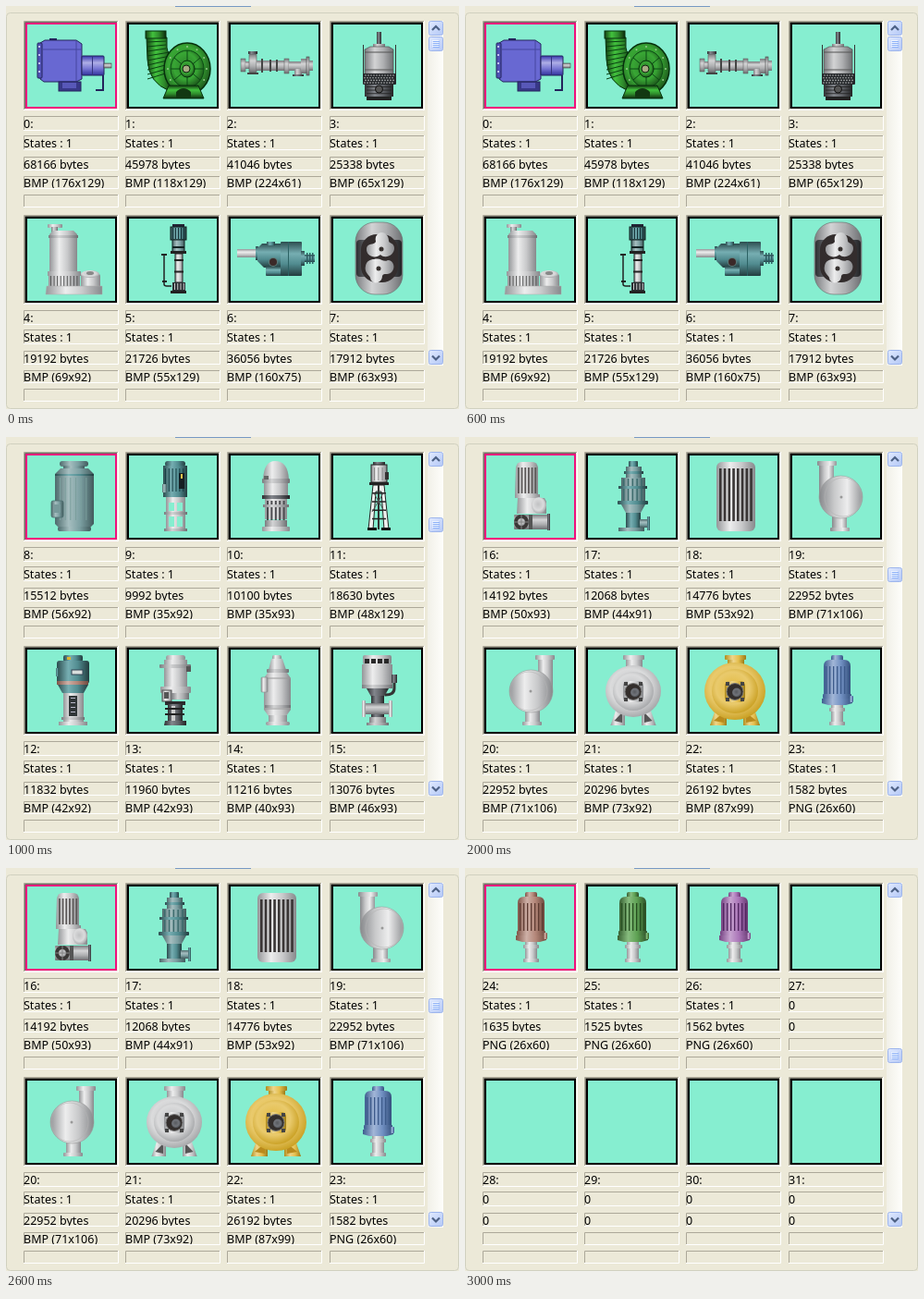
Write an HTML page that moves like this. It is 490 px wide and 436 px high and loops after 4 s.

```html
<!DOCTYPE html>
<html lang="en">
<head>
<meta charset="utf-8">
<title>Pump symbol library</title>
<style>
html, body { margin: 0; width: 100%; height: 100%; overflow: hidden; background: #ece9d8; }
svg { display: block; }
text { font: 12.5px "Noto Sans", "Open Sans", sans-serif; fill: #000; }
</style>
</head>
<body>
<script>
// Palettes [hue, saturation, lightness]; paint 'gx' is grey shaded along x, 'gy' along y, 'gr' radially.
const palettes = {
  g: [220, 2, 66], w: [220, 2, 76], d: [220, 4, 36], t: [184, 28, 41], s: [184, 17, 53],
  b: [240, 52, 62], n: [118, 52, 33], y: [45, 74, 57], u: [217, 40, 57],
  r: [14, 28, 56], e: [112, 32, 45], p: [288, 32, 56]
};
const ramp = [[0, -17], [.35, 17], [.65, 3], [1, -22]];
let defs = '';
for (const [key, [h, s, l]] of Object.entries(palettes)) {
  const stops = list => list.map(([o, k]) => `<stop offset="${o}" stop-color="hsl(${h},${s}%,${l + k}%)"/>`).join('');
  defs += `<linearGradient id="${key}x">${stops(ramp)}</linearGradient>
    <linearGradient id="${key}y" x2="0" y2="1">${stops(ramp)}</linearGradient>
    <radialGradient id="${key}r" cx=".45" cy=".43" r=".6">${stops([[0, 0], [.6, 10], [1, -12]])}</radialGradient>`;
}

const paint = f => f.length === 2 ? `url(#${f})` : f;
const edge = (c, w = 1) => c ? ` stroke="${c}" stroke-width="${w}"` : '';
const rect = (x, y, w, h, f, r = 0, c, cw) =>
  `<rect x="${x}" y="${y}" width="${w}" height="${h}" rx="${r}" fill="${paint(f)}"${edge(c, cw)}/>`;
const oval = (x, y, rx, ry, f, c, w) =>
  `<ellipse cx="${x}" cy="${y}" rx="${rx}" ry="${ry}" fill="${paint(f)}"${edge(c, w)}/>`;
const path = (d, f, c, w) => `<path d="${d}" fill="${paint(f)}"${edge(c, w)}/>`;
const line = (d, c, w = 1) => path(d, 'none', c, w);
const repeat = (n, fn) => Array.from({ length: n }, (_, i) => fn(i)).join('');
const bars = (x, y, w, h, n, c, t = 1) => repeat(n, i => rect(x + i * w / n, y, t, h, c));
const rungs = (x, y, w, h, n, c, t = 1) => repeat(n, i => rect(x, y + i * h / n, w, t, c));
const mirror = (s, w) => `<g transform="translate(${w}) scale(-1 1)">${s}</g>`;

const volute = () => [
  rect(60, 13, 16, 38, 'wx'), rect(57, 10, 21, 5, 'wx', 1),
  rect(46, 64, 16, 19, 'wx'), rect(43, 82, 21, 4, 'wx', 1),
  oval(52.5, 49, 23.5, 23, 'wx', '#999', .6), oval(50, 49, 20, 21, 'none', '#b4b4b4', .6), oval(52, 49, 1.5, 1.5, '#999')
].join('');

const casing = (k, cx, r, dark) => {
  const foot = r * .82;
  return [
    path(`M${cx - foot + 7} 66L${cx - foot} 86H${cx - 9}V72Z`, k + 'x'), path(`M${cx + foot - 7} 66L${cx + foot} 86H${cx + 9}V72Z`, k + 'x'),
    path(`M${cx - foot + 4} 81L${cx - 12} 72V83Z`, dark), path(`M${cx + foot - 4} 81L${cx + 12} 72V83Z`, dark),
    rect(cx - 8, 14, 18, 14, k + 'x'), rect(cx - 11, 10, 23, 5, k + 'x', 1),
    oval(cx, 49, r, r - 2, k + 'r'), oval(cx, 49, r - 8, r - 9, k + 'r'),
    rect(cx - 11, 38, 22, 23, k + 'x', 5),
    ...[[-8, 41], [8, 41], [-8, 58], [8, 58]].map(([x, y]) => rect(cx + x - 2, y - 2, 4, 4, '#444')),
    oval(cx, 49.5, 9, 9, '#332e2c', '#777'), oval(cx + 2, 50.5, 5, 5, 'dr')
  ];
};

const canned = (k, dark) => [
  rect(46, 10, 13, 7, k + 'x', 2), path('M38 37V22Q38 15 45 15H60Q67 15 67 22V37Z', k + 'x'),
  rect(38, 22, 29, 33, k + 'x'), bars(40, 22, 28, 30, 7, dark, 1.3),
  rect(37, 52, 31, 5, k + 'x', 1), path('M36 57H69V62L62 64H43L36 62Z', k + 'x'),
  rect(66, 54, 4, 7, k + 'x', 1), rect(46, 64, 13, 20, 'wx'), rect(44, 67, 17, 4, 'wx', 1), rect(44, 82, 17, 4, 'wx', 1)
];

const pumps = [
  () => [
    rect(28, 19, 8, 4, '#24245c'), path('M18 24L23 21H57L63 25V63L57 66H22L18 63Z', '#6868d2', '#24245c'),
    rect(15, 24, 5, 38, '#5050b4', 1, '#24245c'), line('M21 31H62M57 22V65', '#4646a0'),
    repeat(4, i => rect(16, 27 + i * 9, 2, 2, '#c0c0f0')),
    rect(63, 38, 24, 21, 'by', 1, '#24245c'), rect(74, 38, 1, 21, '#33337c'), rect(87, 46, 8, 5, 'gy', 0, '#444', .6),
    rect(38, 66, 24, 10, '#383888', 0, '#24245c'), rect(42, 67, 15, 6, '#5858b8'), line('M86 59V75H78', '#24245c', 2)
  ],
  () => [
    path('M23 18H45V29Q46 36 52 40L48 76Q25 67 24 42Z', 'nx', '#06300c'),
    repeat(9, i => line(`M24 ${23 + i * 5}L${i < 3 ? 44 : 45 + i} ${22 + i * 4}`, '#0a4012')),
    rect(22, 11, 22, 8, 'nx', 0, '#06300c'),
    oval(67, 52, 25, 28, 'nr', '#06300c', 1.5), oval(67, 52, 18, 20, 'nr', '#0b4a14'),
    repeat(12, i => { const a = i * Math.PI / 6; return oval(67 + 21 * Math.cos(a), 52 + 24 * Math.sin(a), 1, 1, '#94c88a'); }),
    line('M53 40L81 64M53 64L81 40M67 32V72M49 52H85', '#0b4a14'),
    oval(67, 52, 8, 9, 'nr', '#06300c'), oval(66, 52, 4, 4, '#a8aa84', '#121'),
    path('M47 70H79L85 84H41Z', 'ny', '#06300c'), path('M55 83V77Q63 69 71 77V83Z', '#123812')
  ],
  () => [
    rect(15, 41, 5, 14, 'gy', 0, '#555', .5), rect(20, 44, 5, 8, 'gy'), rect(24, 36, 8, 20, 'gy', 1, '#555', .6),
    rect(23, 33, 10, 3, 'dx'), rect(32, 43, 32, 11, 'gy'), rect(37, 41, 2, 15, '#444'),
    rect(46, 42, 2, 13, '#444'), rect(53, 42, 2, 13, '#444'), rect(62, 41, 5, 16, 'gy', 0, '#555', .5), rect(67, 44, 14, 10, 'gy'),
    rect(73, 52, 8, 7, 'gx'), rect(71, 58, 12, 2, 'dx'), rect(80, 41, 6, 16, 'gy'), rect(86, 39, 3, 20, 'gy', 0, '#444', .6),
    rect(89, 43, 4, 11, 'gy'), rect(22, 56, 12, 2, '#444')
  ],
  () => [
    line('M36.500 26V58M71.500 26V58', '#333'), rect(51, 12, 5, 18, 'dx'), rect(47, 25, 13, 5, 'gx'),
    path('M38 31L44 28H64L69 31V58H38Z', 'gx', '#444', .6),
    line('M38 34H69M38 53H69', '#555'), rect(36, 57, 36, 12, '#24272a', 1),
    repeat(4, r => repeat(11, i => oval(39 + i * 3 - r % 2, 59 + r * 2.7, .8, .8, '#b5b7b7'))),
    rect(38, 69, 31, 13, 'dx'), rungs(40, 71, 27, 11, 3, '#222', .8), oval(53.5, 74, 4, 4, '#555', '#111'),
    rect(40, 82, 27, 4, '#222')
  ],
  () => [
    rect(26, 10, 16, 4, 'wx', 1), rect(30, 13, 7, 7, 'gx'), path('M28 21L32 17H54L58 21V64H28Z', 'wx'),
    rect(27, 22, 32, 3, 'gx'), rect(26, 61, 36, 5, 'wx'), rect(27, 66, 34, 12, 'wx'), bars(29, 66, 32, 11, 9, '#555'),
    rect(62, 64, 21, 16, 'wx', 2), oval(72, 64, 10, 4, 'wr'), oval(72, 63, 4, 2, '#888'),
    path('M25 77H85V86H24Z', 'wx', '#aaa', .5)
  ],
  () => [
    rect(51, 10, 13, 3, '#223'), rect(49, 13, 17, 14, 'tx', 0, '#122'), bars(51, 14, 15, 12, 5, '#173238'),
    rect(51, 27, 13, 13, 'sx', 0, '#122'), rect(51, 34, 13, 2, '#122'), rect(49, 39, 17, 3, '#222'),
    rect(54, 42, 8, 31, 'wx', 0, '#222'), rungs(53, 48, 10, 25, 2, '#222', 2),
    line('M42 44V75Q42 77 45 77H50', '#222', 1.5), rect(39, 42, 6, 2, '#222'), rect(40, 71, 5, 2, '#222'),
    rect(51, 73, 14, 10, '#2c3034'), bars(53, 74, 13, 7, 4, '#ccc'), rect(49, 82, 17, 3, '#222')
  ],
  () => [
    rect(11, 37, 24, 9, 'wy'), rect(31, 34, 3, 15, 'ty'), path('M33 36L38 31H59V57H40L33 50Z', 'ty'),
    rect(43, 29, 9, 4, 'tx'), rect(42, 56, 19, 10, 'ty', 1), rect(58, 29, 23, 37, 'ty', 1), rect(66, 29, 1, 37, '#2c6264'),
    rect(80, 39, 4, 16, 'ty'), rect(84, 43, 11, 8, 'ty'), bars(86, 41, 9, 12, 3, '#2c5b60', 1.5),
    oval(50, 51, 5, 5, '#5f7c7a'), oval(50, 51, 4, 4, '#3b2928')
  ],
  () => [
    rect(28, 8, 51, 78, 'gx', 21, '#666', .6), rect(29, 27, 49, 40, 'dx', 4), rect(34, 21, 40, 52, '#332d2d', 17),
    path('M53 20C59 17 64 22 64 28C64 31 70 30 70 36C70 44 60 48 55 43C50 48 39 45 40 36C41 30 48 33 50 29C49 25 50 22 53 20Z', 'wx'),
    path('M48 48C56 46 58 52 63 49C69 49 72 57 67 62C62 66 59 62 57 66C57 75 45 76 44 68C43 65 37 62 39 55C40 50 44 48 48 48Z', 'wx'),
    oval(56, 37, 2.5, 2.5, '#37312f'), oval(53, 58, 2.5, 2.5, '#37312f')
  ],
  () => [
    rect(39, 10, 31, 6, 'sx', 3), rect(43, 15, 23, 5, 'sx'), path('M34 24L40 18H70L76 24V78L72 82H38L34 78Z', 'sx'),
    rect(34, 24, 42, 2, 'tx'), bars(39, 28, 34, 46, 6, '#7b9f9d'), rect(34, 74, 42, 4, 'sx'),
    rect(37, 81, 36, 5, 'sx', 2), rect(30, 53, 13, 18, 'sx', 2, '#496c6e', .8), rect(33, 57, 7, 9, '#77999a')
  ],
  () => [
    rect(43, 10, 22, 6, 'tx', 3), rect(41, 15, 26, 31, 'tx'), bars(43, 18, 23, 25, 6, '#173e43'),
    rect(58, 23, 6, 17, '#152023'), rect(60, 24, 2, 5, '#eac34c'), rect(40, 35, 5, 9, 'sx'), rect(41, 44, 26, 5, 'tx'),
    rect(44, 49, 21, 37, 'wx'), rect(47, 55, 6, 9, '#86eed0'), rect(56, 55, 6, 9, '#86eed0'),
    rect(47, 70, 6, 11, '#86eed0'), rect(56, 70, 6, 11, '#86eed0'), rect(42, 65, 25, 3, 'gx'), rect(42, 83, 25, 3, 'gx')
  ],
  () => [
    path('M39 30Q40 10 52 10Q66 10 67 30Z', 'wx'), rect(38, 29, 30, 5, 'gx', 1), rect(40, 34, 26, 14, 'wx'),
    rect(40, 26, 5, 4, '#666'), rect(38, 47, 30, 4, 'dx'), rect(41, 51, 24, 22, 'wx'), bars(43, 53, 22, 25, 5, '#4b4b4f', 2),
    rect(39, 57, 28, 3, 'gx'), rect(41, 74, 24, 8, 'gx'), rect(38, 81, 30, 5, 'wx', 1)
  ],
  () => [
    rect(47, 11, 13, 3, 'dx'), rect(45, 14, 17, 19, 'wx', 0, '#222'), bars(48, 17, 13, 14, 3, '#888'),
    rect(60, 22, 4, 8, '#333'), rect(43, 33, 21, 3, '#222'),
    path('M47 36H59L64 84H59L56 43H50L47 84H42Z', '#eef0ee', '#222'), line('M53 36V84', '#333', 2),
    rungs(46, 44, 15, 37, 4, '#222', 1.5), line('M48 45L59 64M58 45L46 65', '#555'), rect(41, 82, 10, 3, '#111'), rect(56, 82, 10, 3, '#111')
  ],
  () => [
    rect(43, 10, 21, 7, 'tx', 2), rect(36, 16, 35, 25, 'tx', 3), rect(47, 12, 4, 3, '#e0b52f'),
    rect(52, 26, 12, 5, '#d9dfdd', 0, '#345'), rect(35, 24, 3, 9, 'tx'), rect(36, 38, 34, 4, 'rx'),
    path('M37 42H70L65 51H42Z', 'tx'), rect(43, 51, 22, 31, 'wx'), rect(49, 54, 9, 22, '#303638'),
    rungs(51, 56, 5, 20, 4, '#bbc'), rect(41, 77, 25, 3, 'gx'), rect(38, 82, 31, 4, 'wx')
  ],
  () => [
    rect(44, 10, 21, 6, 'wx', 3), rect(42, 15, 25, 29, 'wx'), rect(37, 20, 34, 4, 'gx', 1), rect(66, 22, 5, 6, '#555'),
    rect(38, 44, 33, 7, 'wx', 1), rect(40, 48, 10, 12, 'wx', 0, '#555'), rect(42, 50, 5, 7, '#555'),
    rect(50, 51, 19, 7, 'gx'), rect(43, 60, 22, 4, '#2b2b2d'), rect(46, 63, 16, 19, 'dx'),
    rect(50, 65, 4, 16, '#ccc'), rungs(43, 67, 21, 12, 2, '#222', 2), path('M43 81H66V86H42Z', 'dx')
  ],
  () => [
    rect(49, 10, 10, 5, 'wx', 2), path('M45 26L48 14H60L64 26Z', 'wx'), rect(43, 25, 24, 4, 'gx', 1),
    path('M40 35L44 29H65L69 35V69L64 76H45L40 69Z', 'wx'), line('M40 35H69M40 68H69', '#999'),
    rect(37, 34, 7, 16, 'wx', 1, '#888', .6), rect(41, 64, 28, 3, 'gx'), rect(45, 75, 20, 8, 'wx'), rect(42, 82, 26, 4, 'wx', 2)
  ],
  () => [
    rect(36, 10, 31, 10, 'wx', 2), bars(38, 14, 28, 5, 4, '#292929', 5), rect(35, 20, 33, 24, 'wx'),
    rect(35, 42, 33, 4, 'gx'), line('M70 34V46Q70 53 60 53', '#333', 3), rect(67, 31, 6, 9, 'dx'),
    path('M40 46H64L59 55H45Z', 'dx'), rect(45, 54, 14, 24, 'dx'), rect(39, 62, 26, 12, 'gy'),
    rect(35, 59, 4, 18, 'wx', 1), rect(64, 59, 4, 18, 'wx', 1), rect(43, 77, 18, 9, 'gx'), rect(40, 83, 24, 3, 'gx')
  ],
  () => [
    path('M36 17Q37 11 42 11H54Q59 11 60 17V47H35Z', 'wx'), bars(38, 17, 22, 28, 6, '#5c5858', 1.8),
    rect(35, 46, 27, 4, 'wx'), path('M38 50H67L69 54V67H37Z', 'wx'), oval(61, 58, 8, 9, 'wr'),
    rect(34, 68, 39, 16, 'gy', 1), oval(42, 76, 8, 8, '#3a3736'), oval(42, 76, 4, 4, 'gr'),
    line('M34 76H50M42 68V84', '#888'), rect(70, 67, 3, 18, 'dx'), rect(50, 68, 4, 16, '#555')
  ],
  () => [
    rect(48, 10, 10, 7, 'tx', 1), rect(45, 16, 17, 13, 'sx'), rect(43, 21, 21, 3, 'tx'),
    rect(40, 28, 26, 27, 'sx'), bars(42, 29, 24, 24, 5, '#3c6a6c', 1.5), rect(37, 37, 31, 3, 'tx'), rect(36, 53, 33, 4, 'tx', 1),
    path('M40 57H66L61 66H45Z', 'sx'), rect(45, 66, 16, 16, 'tx'), rect(60, 73, 9, 9, 'sy'), rect(68, 70, 3, 15, 'tx'),
    rect(37, 82, 28, 4, 'sx')
  ],
  () => [
    rect(33, 11, 42, 75, 'wx', 6), bars(36, 18, 38, 57, 8, '#393535', 2.6),
    rect(33, 75, 42, 3, 'wx', 1)
  ],
  () => [mirror(volute(), 109)],
  () => [volute()],
  () => casing('w', 53, 30, '#555'),
  () => casing('y', 53, 33, '#b98a1c'),
  () => canned('u', '#3c5a8a'),
  () => canned('r', '#5d3a31'),
  () => canned('e', '#254c1f'),
  () => canned('p', '#512560')
];

const files = `68166 176x129,45978 118x129,41046 224x61,25338 65x129,19192 69x92,21726 55x129,36056 160x75,17912 63x93,
15512 56x92,9992 35x92,10100 35x93,18630 48x129,11832 42x92,11960 42x93,11216 40x93,13076 46x93,
14192 50x93,12068 44x91,14776 53x92,22952 71x106,22952 71x106,20296 73x92,26192 87x99,1582 26x60,
1635 26x60,1525 26x60,1562 26x60`.split(',').map(s => s.trim().split(' '));

const columns = [19, 129, 239, 350];
const rows = [[103, 15], [124, 15], [147, 14], [168, 13], [188, 13]];

function label(text, i) {
  const [y, h] = rows[i];
  return line(`M.5 ${y + h}V${y + .5}H102`, '#aca899') + line(`M0 ${y + h + .5}H102.5V${y}`, '#fff') +
    `<svg y="${y}" width="102" height="${h}"><text y="${i === 3 ? 12 : 13}">${text}</text></svg>`;
}

function cell(n) {
  const slot = n % 8, file = files[n];
  const texts = file
    ? [n + ':', 'States : 1', file[0] + ' bytes', `${n < 23 ? 'BMP' : 'PNG'} (${file[1]})`, '']
    : [n + ':', '0', '0', '', ''];
  return `<g transform="translate(${columns[slot % 4]} ${slot < 4 ? 16 : 226})">` +
    line('M.5 96V.5H102', '#aca899') + line('M0 96.5H102.5V0', '#fff') +
    line('M1.500 95V1.500H101', '#716f64') + line('M1 95.5H101.5V1', '#f1efe2') +
    rect(3, 3, 97, 91, '#86eed0', 0, slot ? '#000' : '#f0107c', 2) +
    (file ? pumps[n]().join('') : '') + texts.map(label).join('') + '</g>';
}

const button = (y, mark) => rect(457.5, y + .5, 15, 15, 'url(#btn)', 2, '#9db5ec') + line(mark, '#4d6185', 2.2);

document.body.innerHTML = `<svg width="490" height="436"><defs>${defs}
  <linearGradient id="btn" x2="1" y2="1"><stop stop-color="#e1eaff"/><stop offset="1" stop-color="#b4c8f6"/></linearGradient>
  <linearGradient id="track"><stop stop-color="#f1f0e8"/><stop offset="1" stop-color="#fefefb"/></linearGradient></defs>
  ${rect(0, 0, 490, 436, '#ece9d8')}${rect(183, 0, 82, 1, '#7799c4')}
  ${rect(.5, 7.5, 489, 428, 'none', 4, '#d0d0bf')}
  ${rect(456, 16, 17, 373, 'url(#track)')}
  ${button(16, 'M461 26L465 22L469 26')}${button(372, 'M461 378.500L465 382.500L469 378.500')}
  <g id="thumb">${rect(457.5, 33.5, 15, 15, 'url(#btn)', 2, '#9db5ec')}
  ${rungs(461, 37, 7, 8, 4, '#eef4fe')}${rungs(462, 38, 7, 8, 4, '#8cb0f8')}</g>
  ${repeat(4, p => `<g class="page">${repeat(8, i => cell(p * 8 + i))}</g>`)}</svg>`;

const pages = document.querySelectorAll('.page');
const thumb = document.getElementById('thumb');
const start = performance.now();

function draw(now) {
  const current = Math.floor(Math.max(0, now - start) / 1000) % 4;
  pages.forEach((page, i) => page.style.display = i === current ? '' : 'none');
  thumb.setAttribute('transform', `translate(0 ${current * 54})`);
  requestAnimationFrame(draw);
}
draw(start);
</script>
</body>
</html>
```
